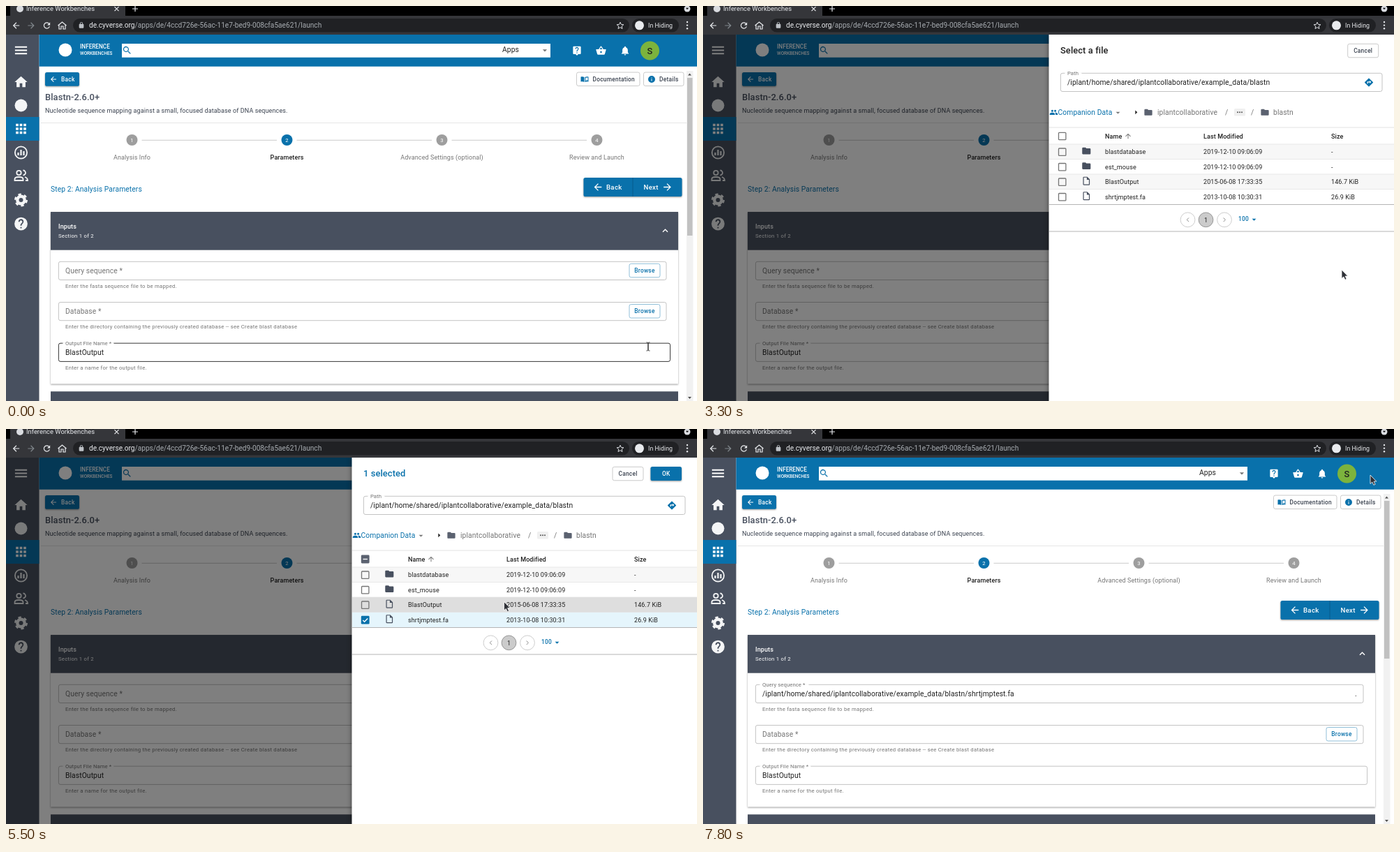
Write an HTML page that moves like this. It is 990 px wide and 566 px high and loops after 8 s.

```html
<!DOCTYPE html>
<html lang="en">
<head>
<meta charset="utf-8">
<title>Inference Workbenches</title>
<style>
html, body { margin: 0; width: 100%; height: 100%; overflow: hidden; background: #fff; }
svg { display: block; font-family: Roboto, sans-serif; }
text { white-space: pre; }
.h6 { font-size: 12.89px; font-weight: 500; letter-spacing: .0075em; }
.body1 { font-size: 10.31px; letter-spacing: .0094em; }
.body2 { font-size: 9.02px; letter-spacing: .0107em; }
.strong { font-size: 9.02px; font-weight: 500; letter-spacing: .0107em; }
.caption { font-size: 7.73px; letter-spacing: .0333em; }
.label { font-size: 7.73px; letter-spacing: .0094em; }
.button { font-size: 8.38px; font-weight: 500; letter-spacing: .0286em; }
.large { font-size: 9.67px; font-weight: 500; letter-spacing: .0286em; }
.url { font-size: 10.15px; }
.tab { font-size: 9.4px; }
.pill { font-size: 8.9px; }
.brand1 { font-size: 8.2px; font-weight: 500; }
.brand2 { font-size: 6.4px; font-weight: 500; }
</style>
</head>
<body>
<svg id="stage" width="990" height="566" viewBox="0 0 990 566"></svg>
<script>
const BLUE = '#0971ab', SLATE = '#48505f', INK = '#212121', GREY = '#757575', PALE = '#bdbdbd';

// Icon outlines on a 24 unit grid
const ICONS = {
  menu: 'M3 18h18v-2H3zm0-5h18v-2H3zm0-7v2h18V6z',
  home: 'M10 20v-6h4v6h5v-8h3L12 3 2 12h3v8z',
  apps: [4, 10, 16].flatMap(x => [4, 10, 16].map(y => `M${x} ${y}h4v4h-4z`)).join(''),
  help: 'M12 2a10 10 0 1 0 0 20 10 10 0 0 0 0-20zm1 17h-2v-2h2zm2.07-7.75l-.9.92C13.45 12.9 13 13.5 13 15h-2v-.5c0-1.1.45-2.1 1.17-2.83l1.24-1.26A2 2 0 1 0 10 9H8a4 4 0 1 1 7.07 2.25z',
  ask: 'M19 2H5a2 2 0 0 0-2 2v14c0 1.1.9 2 2 2h4l3 3 3-3h4a2 2 0 0 0 2-2V4a2 2 0 0 0-2-2zm-6 16h-2v-2h2zm2.07-7.75l-.9.92C13.45 11.9 13 12.5 13 14h-2v-.5c0-1.1.45-2.1 1.17-2.83l1.24-1.26A2 2 0 1 0 10 8H8a4 4 0 1 1 7.07 2.25z',
  basket: 'M17.2 9l-4.4-6.56a1 1 0 0 0-1.66 0L6.8 9H2a1 1 0 0 0-1 1.3l2.6 9.24A2 2 0 0 0 5.5 21h13a2 2 0 0 0 1.9-1.46L23 10.3A1 1 0 0 0 22 9zM9 9l3-4.4L15 9zm3 8a2 2 0 1 1 0-4 2 2 0 0 1 0 4z',
  bell: 'M12 22a2 2 0 0 0 2-2h-4c0 1.1.9 2 2 2zm6-6v-5c0-3.07-1.64-5.64-4.5-6.32V4a1.5 1.5 0 0 0-3 0v.68C7.63 5.36 6 7.92 6 11v5l-2 2v1h16v-1z',
  search: 'M15.5 14h-.8l-.27-.27A6.5 6.5 0 1 0 13.73 14.43l.27.28v.79l5 5L20.5 19zm-6 0a4.5 4.5 0 1 1 0-9 4.5 4.5 0 0 1 0 9z',
  back: 'M20 11H7.83l5.59-5.59L12 4l-8 8 8 8 1.41-1.41L7.83 13H20z',
  next: 'M12 4l-1.41 1.41L16.17 11H4v2h12.17l-5.58 5.59L12 20l8-8z',
  up: 'M4 12l1.41 1.41L11 7.83V20h2V7.83l5.58 5.59L20 12l-8-8z',
  reload: 'M17.65 6.35A8 8 0 1 0 19.73 14h-2.08A6 6 0 1 1 16.22 7.78L13 11h7V4z',
  info: 'M12 2a10 10 0 1 0 0 20 10 10 0 0 0 0-20zm1 15h-2v-6h2zm0-8h-2V7h2z',
  book: 'M1 5c4-1 7-1 10 1v14c-3-2-6-2-10-1zm22 0c-4-1-7-1-10 1v14c3-2 6-2 10-1zm-8 3v8c2-1 4-1 6-1V7c-2 0-4 0-6 1z',
  folder: 'M10 4H4a2 2 0 0 0-2 2v12c0 1.1.9 2 2 2h16a2 2 0 0 0 2-2V8a2 2 0 0 0-2-2h-8z',
  file: 'M14 2H6a2 2 0 0 0-2 2v16c0 1.1.9 2 2 2h12a2 2 0 0 0 2-2V8zM6 20V4h7v5h5v11z',
  people: 'M16 11a3 3 0 1 0 0-6 3 3 0 0 0 0 6zm-8 0a3 3 0 1 0 0-6 3 3 0 0 0 0 6zm0 2c-2.3 0-7 1.2-7 3.5V19h14v-2.5C15 14.2 10.3 13 8 13zm8 0l-1 .05c1.2.85 2 2 2 3.45V19h6v-2.5c0-2.3-4.7-3.5-7-3.5z',
  lock: 'M18 8h-1V6A5 5 0 0 0 7 6v2H6a2 2 0 0 0-2 2v10c0 1.1.9 2 2 2h12a2 2 0 0 0 2-2V10a2 2 0 0 0-2-2zm-3 0H9V6a3 3 0 0 1 6 0z',
  go: 'M21.7 11.3l-9-9a1 1 0 0 0-1.4 0l-9 9a1 1 0 0 0 0 1.4l9 9a1 1 0 0 0 1.4 0l9-9a1 1 0 0 0 0-1.4zM14 14.5V12h-4v3H8v-4a1 1 0 0 1 1-1h5V7.5l3.5 3.5z',
  down: 'M7 10l5 5 5-5z',
  right: 'M10 7l5 5-5 5z',
  less: 'M12 8l-6 6 1.41 1.41L12 10.83l4.59 4.58L18 14z'
};

const text = (style, x, y, value, fill = INK, extra = '') =>
  `<text class="${style}" x="${x}" y="${y}" fill="${fill}" ${extra}>${value}</text>`;
const middle = 'text-anchor="middle"';
const rect = (x, y, w, h, fill, r = 0, extra = '') =>
  `<rect x="${x}" y="${y}" width="${w}" height="${h}" rx="${r}" fill="${fill}" ${extra}/>`;
const circle = (x, y, r, fill, extra = '') => `<circle cx="${x}" cy="${y}" r="${r}" fill="${fill}" ${extra}/>`;
const path = (d, stroke, width = 1, fill = 'none') =>
  `<path d="${d}" fill="${fill}" stroke="${stroke}" stroke-width="${width}"/>`;
const icon = (name, cx, cy, size, fill) =>
  `<path transform="translate(${cx - size / 2} ${cy - size / 2}) scale(${size / 24})" fill="${fill}" fill-rule="evenodd" d="${ICONS[name]}"/>`;
const outline = (x, y, w, h, color, fill = 'none') => rect(x, y, w, h, fill, 2.6, `stroke="${color}" stroke-width=".9"`);
const shadow = 'style="filter:drop-shadow(0 1px 1px #0006)"';

function outlinedButton(x, y, w, label, color = '#3b4350', textX = x + w / 2, extra = middle) {
  return outline(x, y, w, 19.5, color === BLUE ? '#84b8d5' : '#c4c4c4') + text('button', textX, y + 12.9, label, color, extra);
}

function field(x, y, w, hovered, label, notch) {
  return outline(x, y, w, 26.2, hovered ? INK : PALE) +
    (label ? rect(x + 6, y - 1, notch, 3, '#fff') + text('label', x + 9.5, y + 2.6, label, GREY) : '');
}

function browserBar() {
  return rect(0, 0, 990, 41, '#000') + rect(6, -8, 165, 30, '#35363a', 6) + rect(0, 14, 990, 27, '#35363a') +
    circle(20, 4, 5, '#dadce0') + text('tab', 29, 7, 'Inference Workbenches', '#e8eaed') +
    path('M155.5 1.2l6 6m0-6l-6 6M181 4h8m-4-4v8', '#e8eaed', 1.2) +
    circle(976, 4, 4.5, '#dadce0') + icon('down', 976, 3.7, 10, '#000') +
    icon('back', 14.5, 28, 14, '#e8eaed') + icon('next', 36, 28, 14, '#80868b') + icon('reload', 58.5, 28, 14, '#e8eaed') +
    path('M74.5 28l6-5 6 5M76 27v6h3v-4h3v4h3v-6', '#e8eaed', 1.2) +
    rect(96, 18, 797, 19.5, '#202124', 9.7) + icon('lock', 108, 27.5, 10, '#bdc1c6') +
    text('url', 119, 31.2, 'de.cyverse.org<tspan fill="#a6abb0">/apps/de/4ccd726e-56ac-11e7-bed9-008cfa5ae621/launch</tspan>', '#e8eaed') +
    path('M880 23.2l1.4 3.2 3.5.3-2.7 2.3.8 3.5-3-1.9-3 1.9.8-3.5-2.7-2.3 3.5-.3z', '#dadce0') +
    rect(897, 18, 67, 19.5, '#202124', 9.7) + circle(907.5, 27.8, 6.5, '#e8eaed') +
    text('pill', 920, 31, 'In Hiding', '#e8eaed') +
    [23, 27.6, 32.2].map(y => circle(976, y, 1.2, '#e8eaed')).join('');
}

function sidebar() {
  const white = '#f4f5f6';
  return rect(0, 41, 47.5, 525, SLATE) + rect(0, 159, 47.5, 34, BLUE) +
    icon('menu', 21.5, 63.5, 23, '#fff') + icon('home', 21.5, 109, 22, white) + circle(21.5, 142.5, 9, white) +
    icon('apps', 21.5, 176, 22, '#fff') +
    circle(21.5, 210, 8.6, 'none', `stroke="${white}" stroke-width="1.8"`) + path('M17.5 214v-4m4 4v-8m4 8v-6', white, 2.2) +
    circle(18.5, 239, 3.2, 'none', `stroke="${white}" stroke-width="1.8"`) +
    path('M12.5 250v-2c0-4 12-4 12 0v2zM24.5 235.5a3.5 3.5 0 0 1 0 7M27 245c3 1 4 2.500 4 5h-3', white, 1.8) +
    circle(21.5, 278, 5.2, 'none', `stroke="${white}" stroke-width="4.4"`) +
    circle(21.5, 278, 8.2, 'none', `stroke="${white}" stroke-width="2.6" stroke-dasharray="4.300 4.287"`) +
    icon('help', 21.5, 312, 22.5, white);
}

function appBar() {
  return rect(47.5, 41, 943, 45.700, BLUE) + circle(85, 63, 9.500, '#fff') +
    text('brand1', 106, 61, 'INFERENCE', '#fff') + text('brand2', 106, 70, 'WORKBENCHES', '#fff') +
    rect(166, 54, 614, 19.700, '#fff') + icon('search', 173.5, 63.5, 15, BLUE) +
    text('body1', 711, 66.2, 'Apps') + icon('down', 772, 63.500, 15, GREY) +
    icon('ask', 818, 64, 15, '#fff') + icon('basket', 852.5, 64, 15.500, '#fff') + icon('bell', 887, 64, 15.500, '#fff') +
    circle(922.5, 64, 13.500, '#7cb33d') + text('h6', 922.5, 68.500, 'S', INK, middle);
}

function stepper() {
  const labels = ['Analysis Info', 'Parameters', 'Advanced Settings (optional)', 'Review and Launch'];
  return labels.map((label, i) => {
    const x = 180.5 + 222 * i, active = i === 1;
    return circle(x, 192, 8, active ? BLUE : '#9e9e9e') + text('label', x, 194.8, i + 1, '#fff', middle) +
      text(active ? 'strong' : 'body2', x, 220.3, label, active ? INK : GREY, middle) +
      (i < 3 ? path(`M${x + 14} 192.3h193.5`, PALE, .8) : '');
  }).join('');
}

function form(state) {
  const hoverField = (y, h = 26) => !state.drawer && state.y >= y && state.y <= y + h && state.x < 952;
  const query = state.done
    ? field(75.4, 366.3, 870.6, false, 'Query sequence *', 70) +
      text('body1', 85, 383, '/iplant/home/shared/iplantcollaborative/example_data/blastn/shrtjmptest.fa') + text('body1', 934, 383, '.')
    : field(75.4, 366.3, 870.6, hoverField(366)) + text('body1', 85, 383, 'Query sequence *', GREY) +
      (state.onBrowse ? rect(893, 369.3, 44, 19.5, '#e9f2f7', 2.6) : '') +
      (state.ripple && !state.drawer ? circle(915, 379, state.ripple, '#0971ab5c', 'clip-path="url(#browse)"') : '') +
      outlinedButton(893, 369.3, 44, 'Browse', BLUE) + (state.onBrowse ? outline(893, 369.3, 44, 19.5, BLUE) : '');
  return rect(64, 295, 899, 246.500, '#fff', 0, shadow) + rect(64, 295, 899, 54.700, SLATE) +
    text('strong', 75, 319, 'Inputs', '#fff') + text('caption', 75, 332.2, 'Section 1 of 2', '#fff') +
    icon('less', 944.5, 322, 16, '#fff') + query +
    text('caption', 85, 403.7, 'Enter the fasta sequence file to be mapped.', GREY) +
    field(75.4, 424.5, 870.6, hoverField(424)) + text('body1', 85, 441, 'Database *', GREY) +
    outlinedButton(893, 427.5, 44, 'Browse', BLUE) +
    text('caption', 85, 462.4, 'Enter the directory containing the previously created database -- see Create blast database', GREY) +
    field(75.4, 483.2, 876.2, hoverField(483), 'Output File Name *', 73) + text('body1', 85, 500, 'BlastOutput') +
    text('caption', 85, 521, 'Enter a name for the output file.', GREY) + rect(64, 552.3, 899, 20, SLATE);
}

function page(state) {
  return rect(0, 0, 990, 566, '#fff') + sidebar() + appBar() +
    rect(56, 95, 49, 19.800, BLUE, 2.6, shadow) + icon('back', 68, 105, 12, '#fff') + text('button', 79, 108, 'Back', '#fff') +
    outlinedButton(817.5, 95, 90.500, 'Documentation', undefined, 840.5, '') + icon('book', 829, 105, 12, BLUE) +
    outlinedButton(913.500, 95, 57.500, 'Details', undefined, 936, '') + icon('info', 925, 105, 12, BLUE) +
    text('h6', 56, 135.200, 'Blastn-2.6.0+', SLATE) +
    text('body2', 56, 153, 'Nucleotide sequence mapping against a small, focused database of DNA sequences.', '#3b4350') +
    path('M50 167.500H975', '#e0e0e0', .8) + stepper() + text('body1', 64, 265.800, 'Step 2: Analysis Parameters', BLUE) +
    rect(827.500, 246, 141, 27, BLUE, 2.6, shadow) + path('M898 246v27', '#065786', .8) +
    icon('back', 848, 259.500, 16, '#fff') + text('large', 860, 263, 'Back', '#fff') +
    text('large', 913.500, 263, 'Next', '#fff') + icon('next', 947.5, 259.500, 16, '#fff') + form(state) +
    rect(975, 93, 9.500, 473, '#f1f1f1') + rect(976, 103, 7.500, 226, '#c1c1c1') +
    path('M977 99.500l2.500-3 2.500 3zM977 560l2.500 3 2.500-3z', 'none', 0, '#505050');
}

function checkbox(y, mode) {
  if (!mode) return rect(509.5, y - 5, 10.4, 10.4, 'none', 1, `stroke="${GREY}" stroke-width="1.3"`);
  const mark = mode === 'some' ? 'M511.500 0h6.400' : 'M511.300 .2l2.300 2.300 4.600-4.800';
  return rect(508.8, y - 5.7, 11.8, 11.8, mode === 'some' ? '#5b6270' : BLUE, 1.3) +
    `<g transform="translate(0 ${y + .2})">${path(mark, '#fff', 1.4)}</g>`;
}

const FILES = [
  ['blastdatabase', '2019-12-10 09:06:09', '-'],
  ['est_mouse', '2019-12-10 09:06:09', '-'],
  ['BlastOutput', '2015-06-08 17:33:35', '146.7 KiB'],
  ['shrtjmptest.fa', '2013-10-08 10:30:31', '26.9 KiB']
];

function fileTable(state) {
  const rows = FILES.map(([name, date, size], i) => {
    const top = 198 + 21.5 * i, cy = top + 11, base = top + 14.2;
    const hovered = state.y >= top && state.y < top + 21.5;
    const selected = state.selected && i === 3;
    const link = hovered && state.onLink;
    const fill = selected ? '#e5f5fc' : hovered ? '#dedede' : i % 2 ? '#fff' : '#f7f7f7';
    return rect(496, top, 494, 21.5, fill) + path(`M496 ${top}H990`, '#e0e0e0', .7) + checkbox(cy, selected && 'all') +
      icon(i < 2 ? 'folder' : 'file', 549.3, cy - 1.300, 14.500, SLATE) +
      text('body2', 576, base, name, link ? BLUE : INK, link ? 'text-decoration="underline"' : '') +
      text('body2', 717, base, date) + text('body2', 900, base, size);
  }).join('');
  return path('M496 174H990', '#e2e2e2') + checkbox(186.3, state.selected && 'some') +
    text('strong', 576, 189.700, 'Name') + icon('up', 609, 186.500, 11.500, GREY) +
    text('strong', 717, 189.700, 'Last Modified') + text('strong', 900, 189.700, 'Size') + rows +
    path('M496 284.500H990M496 323H990', '#b5b5b5', 1.2) +
    [694.5, 720.5, 747].map((x, i) => circle(x, 306.3, 10.400, i === 1 ? '#cbcbcb' : '#fff', `stroke="${i === 1 ? '#8c8c8c' : '#c8c8c8'}" stroke-width=".9"`)).join('') +
    path('M696 303.500l-2.700 2.800 2.700 2.800M745.700 303.500l2.700 2.800-2.700 2.800', '#8c8c8c') +
    text('body2', 720.5, 309.500, '1', INK, middle) + text('button', 767, 308.300, '100', BLUE) + icon('down', 789.500, 306, 14, BLUE);
}

function drawer(state) {
  const onPath = state.y >= 96 && state.y <= 122;
  const onOk = state.selected && state.x > 923 && state.y > 54 && state.y < 74;
  const header = state.selected
    ? text('h6', 512, 68.300, '1 selected', BLUE) + outlinedButton(869, 54.300, 44, 'Cancel') +
      rect(923.500, 54, 44.500, 20, onOk ? '#064f78' : BLUE, 2.6, shadow) +
      (state.ripple ? circle(956, 67, state.ripple, '#ffffff40', 'clip-path="url(#ok)"') : '') +
      text('button', 945.700, 67.200, 'OK', '#fff', middle)
    : text('h6', 512, 68.300, 'Select a file') + outlinedButton(923.700, 54.300, 44, 'Cancel');
  return rect(0, 41, 990, 525, '#00000080') + rect(495.500, 41, 494.500, 525, '#fff', 0, 'style="filter:drop-shadow(-1px 0 3px #0006)"') + header +
    field(512.400, 96.300, 460.600, onPath, 'Path', 24) +
    text('body1', 522, 113, '/iplant/home/shared/iplantcollaborative/example_data/blastn') + icon('go', 954, 109.500, 14.500, BLUE) +
    icon('people', 502.500, 152.300, 12.500, BLUE) + text('body1', 508.5, 156, 'Companion Data', BLUE) + icon('down', 594.5, 152.800, 14, GREY) +
    icon('right', 620.500, 152.300, 14, INK) + icon('folder', 638, 152.300, 13.500, '#5b6270') +
    text('body1', 651, 156, 'iplantcollaborative', GREY) + text('body1', 748, 156, '/', GREY) +
    rect(761, 147, 16, 10.500, '#f0f0f0', 1.500) + [766, 769, 772].map(x => circle(x, 152.300, 1, '#555')).join('') +
    text('body1', 785, 156, '/', GREY) + icon('folder', 805, 152.300, 13.500, '#5b6270') + text('body1', 817, 156, 'blastn', GREY) +
    fileTable(state);
}

const CURSORS = {
  arrow: path('M0 0v12.500l2.800-2.500 2.100 4.300 2.200-1-2-4.200h3.700z', '#fff', .8, '#2e3036'),
  hand: path('M-1.200 .500c.5-1 2-1 2.400 0l.4 4 4.700 1.200c1 .3 1.200 1 1.100 2l-.9 4v2.200h-6v-1.800l-3.700-4.300c-.6-1 .5-1.900 1.400-1.300l1.100.9z', '#fff', .6, '#2e3036'),
  beam: path('M-2.500-6c1.500 0 2.500.3 2.500 1V5c0 .7 1 1 2.500 1M2.500-6C1-6 0-5.700 0-5V5c0 .7-1 1-2.500 1', '#333', 1)
};

// Pointer travels: start, end, target x, target y
const MOVES = [
  [300, 1000, 915, 378], [3300, 3900, 602, 274], [5300, 5500, 713.5, 247.5],
  [5900, 6000, 770, 176], [6100, 7000, 956, 66]
];

function pointer(t) {
  let x = 920, y = 488;
  for (const [start, end, toX, toY] of MOVES) {
    const p = Math.min(1, Math.max(0, (t - start) / (end - start)));
    const eased = p * p * (3 - 2 * p);
    x += (toX - x) * eased;
    y += (toY - y) * eased;
  }
  return { x, y };
}

function render(t) {
  const state = pointer(t);
  const { x, y } = state;
  state.drawer = t >= 3300 && t < 7800;
  state.selected = t >= 4700;
  state.done = t >= 7800;
  state.onBrowse = !state.drawer && !state.done && x > 893 && x < 937 && y > 369 && y < 389;
  state.onLink = state.drawer && x > 576 && x < 634 && y > 267 && y < 281;
  if (t >= 2200 && t < 3300) state.ripple = Math.min(20, 8 + (t - 2200) * .06);
  if (t >= 7600 && t < 7800) state.ripple = 8 + (t - 7600) * .1;
  const onInput = state.drawer
    ? y > 96 && y < 122 && x < 945
    : [[366, 392], [424, 450], [483, 510]].some(([top, bottom]) => y > top && y < bottom);
  const onOtherBrowse = !state.drawer && y > 427 && y < 447;
  const shape = state.onBrowse || state.onLink || onOtherBrowse ? 'hand' : onInput ? 'beam' : 'arrow';
  return `<clipPath id="browse">${rect(893, 369.3, 44, 19.5, '#000', 2.6)}</clipPath>` +
    `<clipPath id="ok">${rect(923.5, 54, 44.5, 20, '#000', 2.6)}</clipPath>` +
    page(state) + (state.drawer ? drawer(state) : '') + browserBar() +
    `<g transform="translate(${x} ${y})">${CURSORS[shape]}</g>`;
}

const stage = document.getElementById('stage');
const LOOP = 8000, TICK = 100;
const begin = performance.now();
let shown = -1;

function play(now) {
  const t = Math.floor(Math.max(0, now - begin) % LOOP / TICK) * TICK;
  if (t !== shown) stage.innerHTML = render(shown = t);
  requestAnimationFrame(play);
}
play(begin);
</script>
</body>
</html>
```
